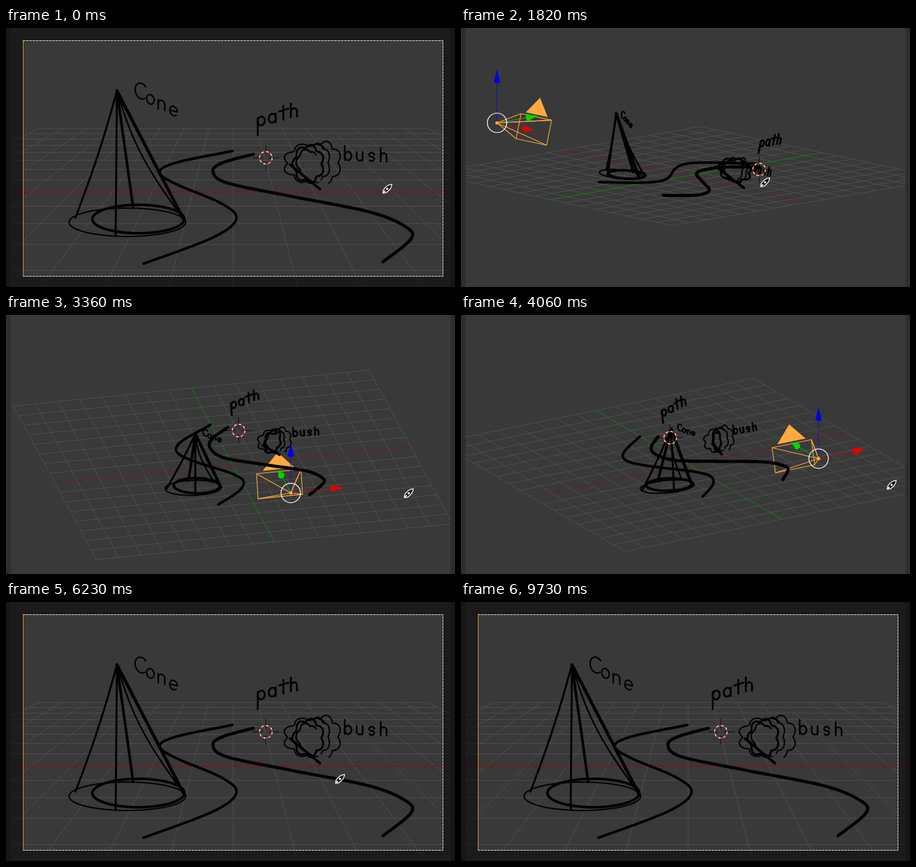
An HTML page with a canvas for the animation above (9940 ms loop, 692 by 400 pixels).

```html
<!DOCTYPE html>
<html>
<head>
<meta charset="utf-8">
<style>
html, body { margin: 0; width: 100%; height: 100%; overflow: hidden; background: #393939; }
canvas { display: block; }
</style>
</head>
<body>
<canvas id="stage" width="692" height="400"></canvas>
<script>
const ctx = document.getElementById('stage').getContext('2d');
const W = 692, H = 400, LOOP = 9940, STEP = 70, TAU = 2 * Math.PI;
const UNIT = 35.2;                 // pixels per world unit in the orthographic view
const CAM = [0, -11.14, 3.84], PITCH = 14.95, PIVOT = [.18, .12, 0];
const ORANGE = '#ffa940';
const rad = d => d * Math.PI / 180;
const mix = (a, b, k) => a + (b - a) * k;
const mixPoint = (p, q, k) => p.map((c, i) => mix(c, q[i], k));
const range = (n, f) => Array.from({ length: n + 1 }, (_, i) => f(i / n));

// ---------- views ----------
function makeView(v) {
  const a = rad(v.az), e = rad(v.el);
  return { dist: 0, ...v, ca: Math.cos(a), sa: Math.sin(a), ce: Math.cos(e), se: Math.sin(e) };
}
const shotView = makeView({ az: 0, el: PITCH, pivot: CAM, focal: 731, cx: 350, cy: 201.3, shot: true });

function turn(v, [x, y, z]) {
  const h = y * v.ca - x * v.sa;
  return [x * v.ca + y * v.sa, h * v.se + z * v.ce, h * v.ce - z * v.se];
}
function toView(v, p) {
  const q = turn(v, p.map((c, i) => c - v.pivot[i]));
  q[2] += v.dist;
  return q;
}
function toScreen(v, [x, up, depth]) {
  const k = v.ortho ? UNIT : v.focal / depth;
  return [v.cx + x * k, v.cy - up * k];
}

// drag of the view: time, azimuth, elevation
const orbit = [
  [490, 0, 15], [1610, 50, 10.2], [1820, 48.1, 11.1], [2800, 18.5, 27.7], [3640, -29, 24.6],
  [3850, -30.6, 20.3], [4060, -30.6, 20.3], [5040, 25.9, 28.6], [5250, 27, 24.4]
];
function orbitAt(t) {
  const next = orbit.findIndex(key => key[0] >= t);
  if (next < 0) return orbit[orbit.length - 1];
  if (next === 0) return orbit[0];
  const a = orbit[next - 1], b = orbit[next];
  return mixPoint(a, b, (t - a[0]) / (b[0] - a[0]));
}
function viewAt(t) {
  if (t < 560 || t >= 6230) return shotView;
  const [, az, el] = orbitAt(t), cx = 354.8, cy = 229.1;
  if (t < 6020) return makeView({ az, el, pivot: PIVOT, ortho: true, cx, cy });
  const s = (t - 5950) / 280, k = s * s * (3 - 2 * s);
  return makeView({
    az: mix(az, 0, k), el: mix(el, PITCH, k), pivot: mixPoint(PIVOT, CAM, k),
    dist: 10.8 * (1 - k), focal: 380, cx, cy
  });
}
// the pointer drags the view, so its place follows from the angles
function pointerAt(t) {
  if (t >= 8190) return null;
  if (t >= 5390) {
    const n = Math.max(0, (t - 7910) / STEP);
    return [507 + 55 * n, 265 + 21 * n];
  }
  const [, az, el] = orbitAt(t);
  return [Math.round(580 - 2.47 * az), Math.round(240 + 2.55 * (el - 15))];
}

// ---------- strokes: drawn in the shot, then set into space ----------
const strokes = [];
const stroke = (width, place, points) =>
  strokes.push({ width, points: points.map(([x, y]) => place(x, y)) });

function atDepth(x, y, d) {
  const { cx, cy, focal, ce, se } = shotView, u = (x - cx) / focal, v = (cy - y) / focal;
  return [CAM[0] + u * d, CAM[1] + (ce + v * se) * d, CAM[2] + (v * ce - se) * d];
}
const groundDepth = y => CAM[2] / (shotView.se - (shotView.cy - y) / shotView.focal * shotView.ce);
const onGround = (x, y) => atDepth(x, y, groundDepth(y));
const facing = d => (x, y) => atDepth(x, y, d);
const slanted = (x, y) => atDepth(x, y, 10.46 / (1 - 1.08 * (x - 350) / 731));

const arc = (cx, cy, rx, ry, from = 0, to = 1, lobes = 0) => range(48, k => {
  const a = TAU * mix(from, to, k), r = 1 + (lobes && .22 * Math.abs(Math.sin(lobes * a / 2)) - .1);
  return [cx + rx * r * Math.cos(a), cy + ry * r * Math.sin(a)];
});
function curve(pts) {
  const at = i => pts[Math.min(pts.length - 1, Math.max(0, i))];
  return pts.slice(1).flatMap((_, i) => range(10, s => [0, 1].map(j => {
    const [a, b, c, d] = [-1, 0, 1, 2].map(n => at(i + n)[j]);
    return b + .5 * s * (c - a + s * (2 * a - 5 * b + 4 * c - d + s * (3 * (b - c) + d - a)));
  })));
}

// the two sides of the path
stroke(4, onGround, curve([[349, 190], [262, 208], [237, 223], [262, 241], [332, 271], [355, 295], [318, 324], [212, 364]]));
stroke(4.8, onGround, curve([[381, 195], [334, 208], [319, 221], [340, 239], [440, 260], [560, 284], [616, 307], [624, 326], [581, 361]]));

// cone: two rings on the ground, legs from the apex to a foot
const APEX = [171, 97], APEX_DEPTH = 8.95;
function leg(width, foot, bow = 0) {
  const points = range(16, k => {
    const [x, y] = mixPoint(APEX, foot, k);
    const depth = 1 / mix(1 / APEX_DEPTH, 1 / groundDepth(foot[1]), k);
    return [x + bow * Math.sin(Math.PI * k), y, depth];
  });
  strokes.push({ width, points: points.map(p => atDepth(...p)) });
}
stroke(2, onGround, arc(187, 300, 90, 22));
stroke(4, onGround, arc(204, 295, 71, 22));
leg(3, [107, 293], 3);
leg(3, [169, 320]);
leg(4, [196, 278]);
leg(4.8, [275, 298]);
leg(2.4, [266, 285], -12);

// bush: lobed outlines in two planes
stroke(2, facing(12.6), arc(468, 209, 37, 28, .2, .85, 8));
stroke(2, facing(12.6), arc(489, 208, 25, 30, -.3, .2, 7));
stroke(2, facing(12.6), arc(480, 208, 18, 27, -.3, .2, 6));
stroke(3, slanted, arc(466, 210, 22, 27, 0, 1, 7));
stroke(2.5, slanted, arc(464, 208, 15, 19, .3, .9, 5));
stroke(4, slanted, [[438, 211], [484, 249]]);

// handwriting: letters of stems, bowls and arches, one unit being the x-height
const stem = (x, top, bottom = 0) => [[x, top], [x, bottom]];
const bowl = (from = 0, to = 1) => arc(.4, -.5, .4, .5, from, to);
const arch = [...arc(.35, -.6, .35, .4, .5, 1), [.7, 0]];
const cup = [[0, -1], ...arc(.35, -.4, .35, .4, .5, 0), [.7, -1]];
const LETTERS = {
  C: [arc(.65, -.83, .65, .83, -.12, -.85)],
  o: [bowl()],
  n: [stem(0, -1), arch],
  e: [[[0, -.5], ...bowl(0, -.87)]],
  p: [stem(0, -.9, 1.1), bowl()],
  a: [bowl(), stem(.8, -1)],
  t: [stem(.4, -1.6), [[-.1, -1], [1, -1.2]]],
  h: [stem(0, -1.6), arch],
  b: [stem(0, -1.7), bowl()],
  u: [cup, stem(.7, -1)],
  s: [[...arc(.35, -.75, .3, .25, 0, -.75), ...arc(.35, -.25, .3, .25, -.25, .4)]]
};
function write(text, { x, y, dx, dy, size, width, depth }) {
  [...text].forEach((ch, i) => LETTERS[ch].forEach(part =>
    stroke(width, facing(depth), part.map(([px, py]) =>
      [x + i * dx + px * size, y + i * dy + (py + .5 * px * dy / dx) * size]))));
}
write('Cone', { x: 199, y: 107, dx: 17.8, dy: 9, size: 14.5, width: 2.2, depth: APEX_DEPTH });
write('path', { x: 388, y: 151, dx: 17, dy: -4.3, size: 13.5, width: 2.8, depth: 15 });
write('bush', { x: 522, y: 204, dx: 18.5, dy: .7, size: 13, width: 2.5, depth: 12.8 });

// ---------- rendering ----------
function line(v, points, color, width, dash = []) {
  const near = .2;
  const cut = (p, q) => mixPoint(p, q, (near - p[2]) / (q[2] - p[2]));
  let open = false;
  ctx.beginPath();
  for (let i = 1; i < points.length; i++) {
    let a = toView(v, points[i - 1]), b = toView(v, points[i]);
    if (!v.ortho) {
      if (a[2] < near && b[2] < near) { open = false; continue; }
      if (a[2] < near) { a = cut(a, b); open = false; }
      else if (b[2] < near) b = cut(b, a);
    }
    if (!open) ctx.moveTo(...toScreen(v, a));
    ctx.lineTo(...toScreen(v, b));
    open = true;
  }
  ctx.setLineDash(dash);
  ctx.strokeStyle = color;
  ctx.lineWidth = width;
  ctx.stroke();
  ctx.setLineDash([]);
}
function disc(radius, color, filled) {
  ctx.beginPath();
  ctx.arc(0, 0, radius, 0, TAU);
  ctx.lineWidth = 1.2;
  ctx.fillStyle = ctx.strokeStyle = color;
  filled ? ctx.fill() : ctx.stroke();
}
function drawGrid(v) {
  for (let i = -8; i <= 8; i++) {
    if (i || v.shot) line(v, [[i, -8, 0], [i, 8, 0]], '#4e4e4e', 1);
    if (i) line(v, [[-8, i, 0], [8, i, 0]], '#4e4e4e', 1);
  }
  if (!v.shot) line(v, [[0, -8, 0], [0, 8, 0]], '#148214', 1);
  line(v, [[-8, 0, 0], [8, 0, 0]], '#900a10', v.shot ? 1.3 : 1, v.shot ? [] : [4, 3]);
}
function drawCameraObject(v) {
  const local = (x, up, d = 2.24) => [
    x, CAM[1] + d * shotView.ce + up * shotView.se, CAM[2] - d * shotView.se + up * shotView.ce];
  const frame = range(4, k => {
    const a = TAU * (k + .125);
    return local(Math.sign(Math.cos(a)), .56 * Math.sign(Math.sin(a)));
  });
  line(v, frame, ORANGE, 1.1);
  frame.forEach(corner => line(v, [CAM, corner], ORANGE, 1.1));
  const roof = [local(-.72, .66), local(.72, .66), local(0, 1.42)].map(p => toView(v, p));
  if (!v.ortho && roof.some(p => p[2] < .2)) return;
  ctx.beginPath();
  roof.forEach(p => ctx.lineTo(...toScreen(v, p)));
  ctx.fillStyle = ORANGE;
  ctx.fill();
}
function drawArrow(v, color, axis) {
  const [x, up] = turn(v, axis), len = Math.hypot(x, up), neck = 64 * len;
  ctx.save();
  ctx.rotate(Math.atan2(-up, x));
  ctx.strokeStyle = ctx.fillStyle = color;
  ctx.lineWidth = 1;
  ctx.globalAlpha = .65;
  ctx.beginPath();
  ctx.moveTo(0, 0);
  ctx.lineTo(neck, 0);
  ctx.stroke();
  ctx.globalAlpha = 1;
  ctx.beginPath();
  ctx.ellipse(neck, 0, 5 * Math.sqrt(Math.max(0, 1 - len * len)), 5, 0, 0, TAU);
  ctx.fill();
  ctx.beginPath();
  ctx.moveTo(neck, -5);
  ctx.lineTo(84 * len, 0);
  ctx.lineTo(neck, 5);
  ctx.fill();
  ctx.restore();
}
function drawGizmo(v) {
  const center = toView(v, CAM);
  if (!v.ortho && center[2] < .5) return;
  ctx.save();
  ctx.translate(...toScreen(v, center));
  drawArrow(v, '#e60000', [1, 0, 0]);
  drawArrow(v, '#00d800', [0, 1, 0]);
  drawArrow(v, '#0000e0', [0, 0, 1]);
  disc(15, '#fff');
  disc(2.6, ORANGE, true);
  ctx.restore();
}
function drawTarget(v) {
  const p = toView(v, [1.03, 3.34, 0]);
  if (!v.ortho && p[2] < .5) return;
  ctx.save();
  ctx.translate(...toScreen(v, p).map(c => Math.floor(c) + .5));
  ctx.strokeStyle = '#0c0c0c';
  ctx.lineWidth = 1;
  ctx.beginPath();
  for (const s of [-1, 1]) {
    ctx.moveTo(5 * s, 0); ctx.lineTo(20 * s, 0);
    ctx.moveTo(0, 5 * s); ctx.lineTo(0, 20 * s);
  }
  ctx.stroke();
  disc(9.7, '#e02020');
  ctx.setLineDash([9.7 * TAU / 16]);
  disc(9.7, '#fff');
  ctx.restore();
}
function drawShotFrame() {
  ctx.fillStyle = 'rgba(0,0,0,.52)';
  ctx.beginPath();
  ctx.rect(0, 0, W, H);
  ctx.rect(26, 19, 648, 365);
  ctx.fill('evenodd');
  ctx.lineWidth = 1;
  ctx.strokeStyle = '#777';
  ctx.strokeRect(26.5, 19.5, 647, 364);
  ctx.setLineDash([3, 2]);
  ctx.strokeStyle = '#e0e0e0';
  ctx.strokeRect(26.5, 19.5, 647, 364);
  ctx.setLineDash([]);
  ctx.fillStyle = '#e09030';
  ctx.fillRect(26, 20, 1, 363);
}
function drawPointer([x, y]) {
  ctx.save();
  ctx.translate(x + 8, y + 8);
  ctx.rotate(-Math.PI / 4);
  ctx.lineWidth = 1.3;
  ctx.strokeStyle = '#fff';
  ctx.fillStyle = '#111';
  ctx.beginPath();
  ctx.moveTo(-10, 0);
  ctx.lineTo(-6, -3);
  ctx.quadraticCurveTo(4, -5, 9.5, 0);
  ctx.quadraticCurveTo(4, 5, -6, 3);
  ctx.closePath();
  ctx.fill();
  ctx.stroke();
  ctx.fillStyle = '#fff';
  ctx.fillRect(-9, -1, 4, 2);
  ctx.fillRect(-2, -1.5, 3, 3);
  ctx.restore();
}
function draw(now) {
  const t = Math.floor(now % LOOP / STEP) * STEP;
  const v = viewAt(t), pointer = pointerAt(t);
  ctx.fillStyle = '#393939';
  ctx.fillRect(0, 0, W, H);
  ctx.save();
  ctx.beginPath();
  ctx.rect(7, 0, 678, H);
  ctx.clip();
  ctx.lineJoin = 'round';
  drawGrid(v);
  if (!v.shot) drawCameraObject(v);
  ctx.lineCap = 'round';
  for (const s of strokes) line(v, s.points, '#000', s.width);
  ctx.lineCap = 'butt';
  if (!v.shot) drawGizmo(v);
  drawTarget(v);
  ctx.restore();
  if (v.shot) drawShotFrame();
  ctx.fillStyle = 'rgba(0,0,0,.2)';
  ctx.fillRect(0, 0, 7, H);
  ctx.fillRect(685, 0, 7, H);
  if (pointer) drawPointer(pointer);
}
const start = performance.now();
function tick() {
  draw(performance.now() - start);
  requestAnimationFrame(tick);
}
tick();
</script>
</body>
</html>
```
